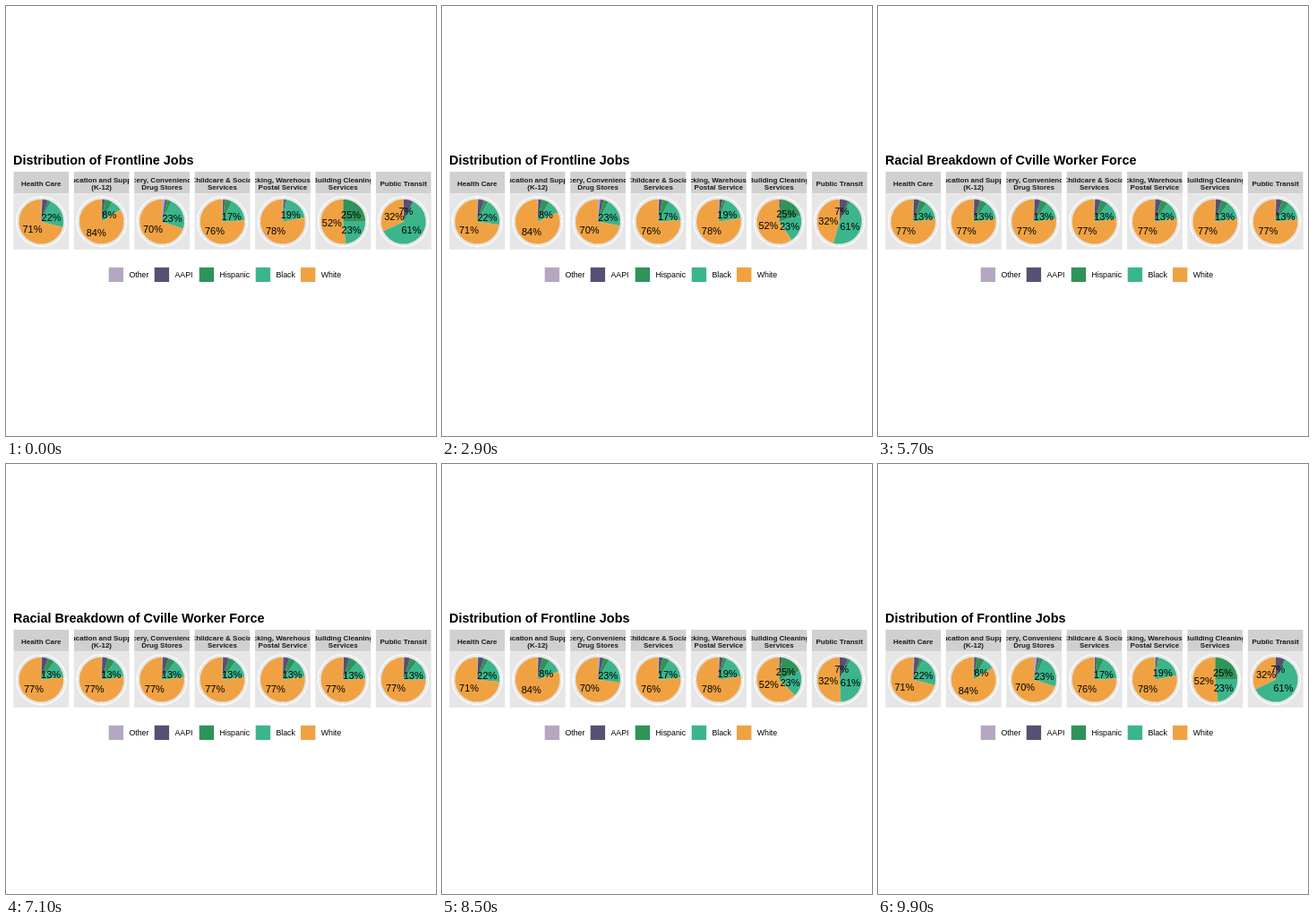
An HTML page that plays this animation: 480x480 px, repeating every 10000 ms.

```html
<!DOCTYPE html>
<html lang="en">
<head>
<meta charset="utf-8">
<title>Workforce pies</title>
<style>
html, body { margin: 0; width: 100%; height: 100%; overflow: hidden; background: #fff; }
svg { display: block; font-family: "Liberation Sans", Arial, Helvetica, sans-serif; }
.strip { font: bold 8px "Liberation Sans", Arial, sans-serif; fill: #1a1a1a; text-anchor: middle; }
.label { font-size: 11px; text-anchor: middle; }
#title { font-size: 14.4px; font-weight: bold; }
.legend { font-size: 8.8px; }
.grid { fill: none; stroke: #fff; stroke-width: 1.07; }
.minor { stroke-width: .53; }
</style>
</head>
<body>
<svg width="480" height="480" viewBox="0 0 480 480">
  <text id="title" x="8" y="177.2"></text>
  <g id="frame"></g>
  <g id="pies"></g>
</svg>
<script>
const SIZE = 62, PITCH = 67.4, LEFT = 8.3, CY = 240.7, R = 24.9, RING = 27.9;
const titles = ['Distribution of Frontline Jobs', 'Racial Breakdown of Cville Worker Force'];
const groups = [
  ['Other', '#b5a7c0', 115], ['AAPI', '#575075', 166], ['Hispanic', '#2e9459', 216],
  ['Black', '#3bb58b', 279], ['White', '#f0a243', 329.3]
];
// Shares in the order of the groups
const jobs = [
  [['Health Care'], [.8, 4.2, 2, 22, 71]],
  [['Education and Support', '(K-12)'], [.5, 2, 5.5, 8, 84]],
  [['Grocery, Convenience, &amp;', 'Drug Stores'], [2.2, 1.6, 3.2, 23, 70]],
  [['Childcare &amp; Social', 'Services'], [.5, 1.5, 5, 17, 76]],
  [['Trucking, Warehouse, &amp;', 'Postal Service'], [.8, 1.2, 1, 19, 78]],
  [['Building Cleaning', 'Services'], [0, 0, 25, 23, 52]],
  [['Public Transit'], [0, 7, 0, 61, 32]]
];
const overall = [.5, 4.3, 5.2, 13, 77];

const byId = id => document.getElementById(id);
const centerX = k => LEFT + SIZE / 2 + k * PITCH;
const at = (cx, share, r) => {
  const a = share / 50 * Math.PI;
  return [cx + r * Math.sin(a), CY - r * Math.cos(a)];
};

function panel([lines], k) {
  const cx = centerX(k), x = cx - SIZE / 2;
  const text = lines.map((line, n) =>
    `<text class="strip" x="${SIZE / 2}" y="${15.8 + (n - (lines.length - 1) / 2) * 8}">${line}</text>`).join('');
  let ticks = '';
  for (let n = 0; n < 8; n++)
    ticks += `<path class="grid ${n % 2 ? 'minor' : ''}" d="M${at(cx, n * 12.5, R)}L${at(cx, n * 12.5, RING)}"/>`;
  return `<rect x="${x}" y="209.6" width="${SIZE}" height="62.2" fill="#e6e6e6"/>
    <svg x="${x}" y="185" width="${SIZE}" height="24.6" overflow="hidden">
      <rect width="100%" height="100%" fill="#d0d0d0"/>${text}</svg>
    ${ticks}<circle class="grid" cx="${cx}" cy="${CY}" r="${RING}"/>`;
}

function pie([, shares], k, p) {
  const cx = centerX(k), named = p < .5 ? shares : overall;
  let start = 0, slices = '', labels = '';
  groups.forEach(([, color], n) => {
    const share = shares[n] + (overall[n] - shares[n]) * p, end = start + share;
    if (share > 0)
      slices += `<path fill="${color}" d="M${cx},${CY}L${at(cx, start, R)}A${R},${R} 0 ${+(share > 50)} 1 ${at(cx, end, R)}Z"/>`;
    if (named[n] >= 7) {
      const [x, y] = at(cx, (start + end) / 2, R / 2);
      labels += `<text class="label" x="${x}" y="${y + 4.9}">${named[n]}%</text>`;
    }
    start = end;
  });
  return slices + labels;
}

const key = ([name, color, x]) =>
  `<rect x="${x - .3}" y="291.8" width="16.4" height="16.2" fill="${color}"/>
   <text class="legend" x="${x + 22.4}" y="303.1">${name}</text>`;

// Hold for a sixth of the loop, ease for a third, then the same way back
function progress(step) {
  const half = step % 50, u = Math.max(0, (half - 50 / 3) / (100 / 3));
  const eased = (1 - Math.cos(Math.PI * u)) / 2;
  return step < 50 ? eased : 1 - eased;
}

byId('frame').innerHTML = jobs.map(panel).join('') + groups.map(key).join('');
const began = performance.now();
let shown = -1;
function draw() {
  const step = Math.floor((performance.now() - began) / 100) % 100;
  if (step !== shown) {
    shown = step;
    const p = progress(step);
    byId('title').textContent = titles[p < .5 ? 0 : 1];
    byId('pies').innerHTML = jobs.map((job, k) => pie(job, k, p)).join('');
  }
  requestAnimationFrame(draw);
}
draw();
</script>
</body>
</html>
```
